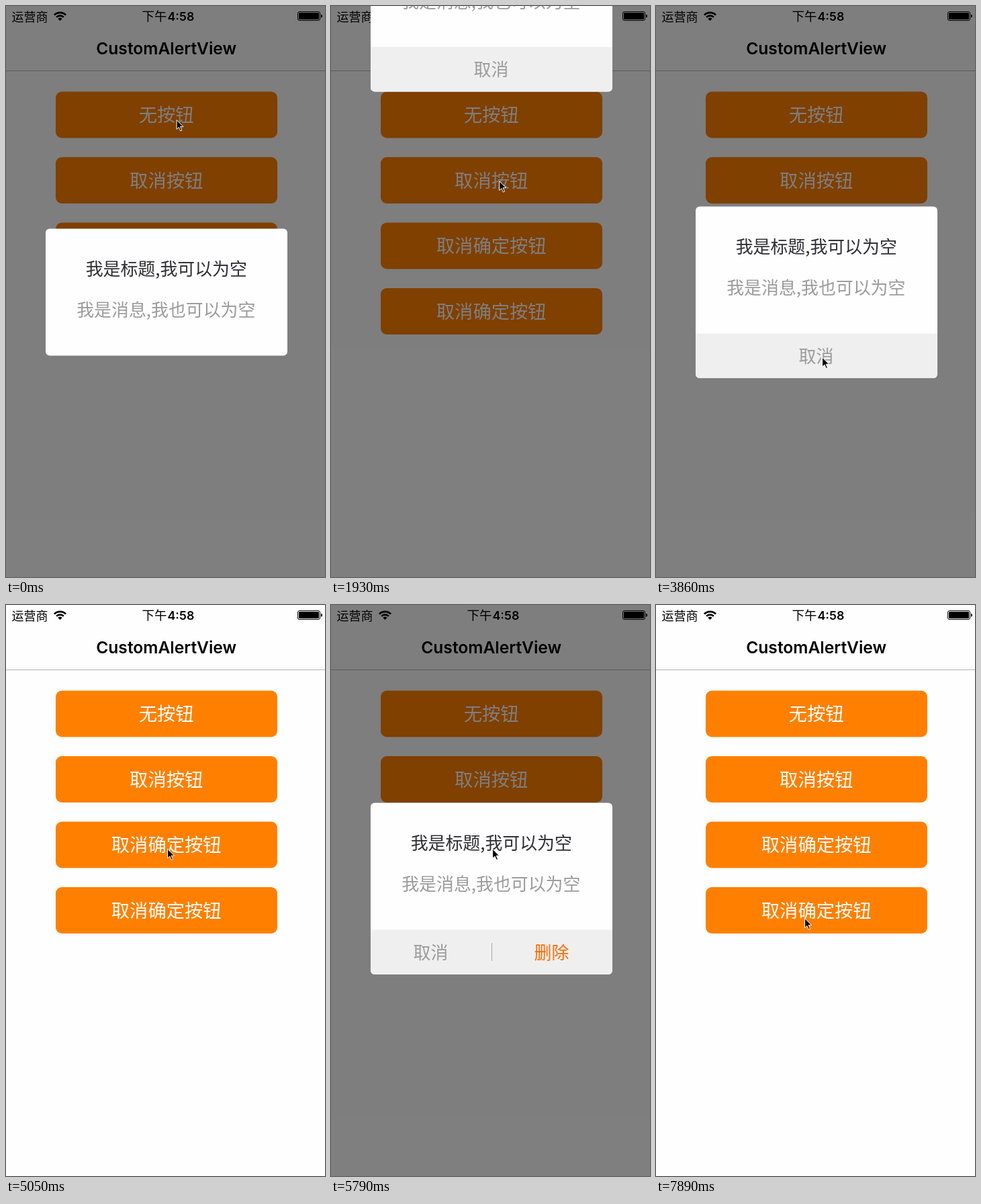
Animation of 475x850 px, one loop 8000 ms. Source, as an HTML page:

```html
<!DOCTYPE html>
<html lang="zh-CN">
<head>
<meta charset="utf-8">
<title>CustomAlertView</title>
<style>
html, body { margin: 0; width: 100%; height: 100%; overflow: hidden; background: #fefefe; }
svg { display: block; width: 475px; height: 850px; }
text { font: 25.9px "Noto Sans CJK SC", "Noto Sans CJK", sans-serif; text-anchor: middle; }
.latin { font-family: Inter, sans-serif; font-weight: 600; }
#buttons text { font-size: 27.3px; fill: #fff; }
#status text { font-size: 18px; text-anchor: start; }
#status .time { font-size: 18.5px; font-weight: 500; }
#status .latin { font-size: 17.8px; }
.gray { fill: #9b9b9b; }
</style>
</head>
<body>
<svg viewBox="0 0 475 850">
  <rect width="475" height="850" fill="#fefefe"/>
  <g id="status">
    <text x="8.5" y="22.5">运营商</text>
    <g transform="translate(80.5 22)" fill="none" stroke="#000" stroke-width="2.6">
      <path d="M-8.6-8.6A12.2 12.2 0 0 1 8.6-8.6M-5.4-5.4A7.7 7.7 0 0 1 5.4-5.4"/>
      <path d="M0 0L-3.1-3.1A4.4 4.4 0 0 1 3.1-3.1z" fill="#000" stroke="none"/>
    </g>
    <text class="time" x="202.6" y="22.3">下午</text>
    <text class="latin" x="240.5" y="22">4:58</text>
    <rect x="434.5" y="8.5" width="33" height="13" rx="2.5" fill="none" stroke="#000"/>
    <rect x="436" y="10" width="30" height="10" rx="1.2"/>
    <path d="M469 12.5a2 2.5 0 0 1 0 5z"/>
  </g>
  <text class="latin" x="238.7" y="72" style="font-size:24.6px">CustomAlertView</text>
  <rect y="96" width="475" height="1" fill="#b4b4b4"/>
  <g id="buttons"></g>
  <rect id="dim" width="475" height="850" fill-opacity=".5"/>
  <g id="alert">
    <rect id="panel" x="59" width="360" rx="6" fill="#fefefe"/>
    <text x="238.8" y="69.7" fill="#2e2e33">我是标题,我可以为空</text>
    <text x="238.3" y="130.5" class="gray">我是消息,我也可以为空</text>
    <g id="footer">
      <path d="M59 189h360v60.5a6 6 0 0 1-6 6h-348a6 6 0 0 1-6-6z" fill="#efefef"/>
      <text id="cancel" y="232.3" class="gray">取消</text>
      <g id="confirm">
        <rect x="239" y="208.5" width="1" height="27" fill="#a8a8a8"/>
        <text x="328.5" y="232.3" fill="#ff6a00">删除</text>
      </g>
    </g>
  </g>
  <path id="cursor" d="M.6 1.2V15L3.9 12 6.4 17.5 8.5 16.6 6.1 11.2H10.6z" stroke="#fff"/>
</svg>
<script>
const LOOP = 8000, STEP = 148.8, LEAD = 14;
const $ = id => document.getElementById(id);
const show = (id, on) => $(id).style.display = on ? '' : 'none';

$('buttons').innerHTML = ['无按钮', '取消按钮', '取消确定按钮', '取消确定按钮'].map((label, i) => {
  const y = 127.5 + 97.5 * i;
  return `<rect x="74" y="${y}" width="330" height="69" rx="9" fill="#ff8000"/>
    <text x="238.7" y="${y + 44.8}">${label}</text>`;
}).join('');

// start and end in ms; choices is the number of footer buttons
const alerts = [
  { start: -2000, end: 590, choices: 0 },
  { start: 1876, end: 4160, choices: 1 },
  { start: 5229, end: 7285, choices: 2 }
];

// cursor moves: start, end, then start point, control point, end point
const moves = [
  [740, 1785, 253.5, 168.5, 252, 215, 250, 259.5],
  [2825, 3868, 250, 259.5, 265, 390, 247, 522],
  [4315, 5055, 247, 522, 243, 440, 240, 362],
  [6395, 6995, 240, 362, 284, 425, 190, 515],
  [7440, 7886, 190, 515, 202, 490, 221, 465.5]
];

// damped spring from 0 to 1, s in seconds
function spring(s) {
  const zeta = .617, omega = 13.9, root = Math.sqrt(1 - zeta * zeta), a = omega * root * s;
  return 1 - Math.exp(-zeta * omega * s) * (Math.cos(a) + zeta / root * Math.sin(a));
}

function drawAlert(t) {
  const a = alerts.find(a => t >= a.start && t < a.end);
  show('dim', a);
  show('alert', a);
  if (!a) return;
  const height = a.choices ? 255.5 : 189;
  const rest = a.choices ? 298.5 : 331.5;
  const y = -height + (rest + height) * spring((t - a.start) / 1000);
  $('alert').setAttribute('transform', `translate(0 ${y})`);
  $('panel').setAttribute('height', height);
  show('footer', a.choices);
  show('confirm', a.choices > 1);
  $('cancel').setAttribute('x', a.choices > 1 ? 148.5 : 238.5);
}

function drawCursor(t) {
  const [start, end, x0, y0, x1, y1, x2, y2] = moves.findLast(m => t >= m[0]) || moves[0];
  const p = Math.min(1, Math.max(0, (t - start) / (end - start)));
  const u = p * p * (3 - 2 * p), v = 1 - u;
  const curve = (a, b, c) => v * v * a + 2 * u * v * b + u * u * c;
  $('cursor').setAttribute('transform', `translate(${curve(x0, x1, x2)} ${curve(y0, y1, y2)})`);
}

// the screen refreshes in coarse steps, about seven per second
function frame() {
  const t = Math.floor((performance.now() % LOOP + LEAD) / STEP) * STEP;
  drawAlert(t);
  drawCursor(t);
  requestAnimationFrame(frame);
}
frame();
</script>
</body>
</html>
```
